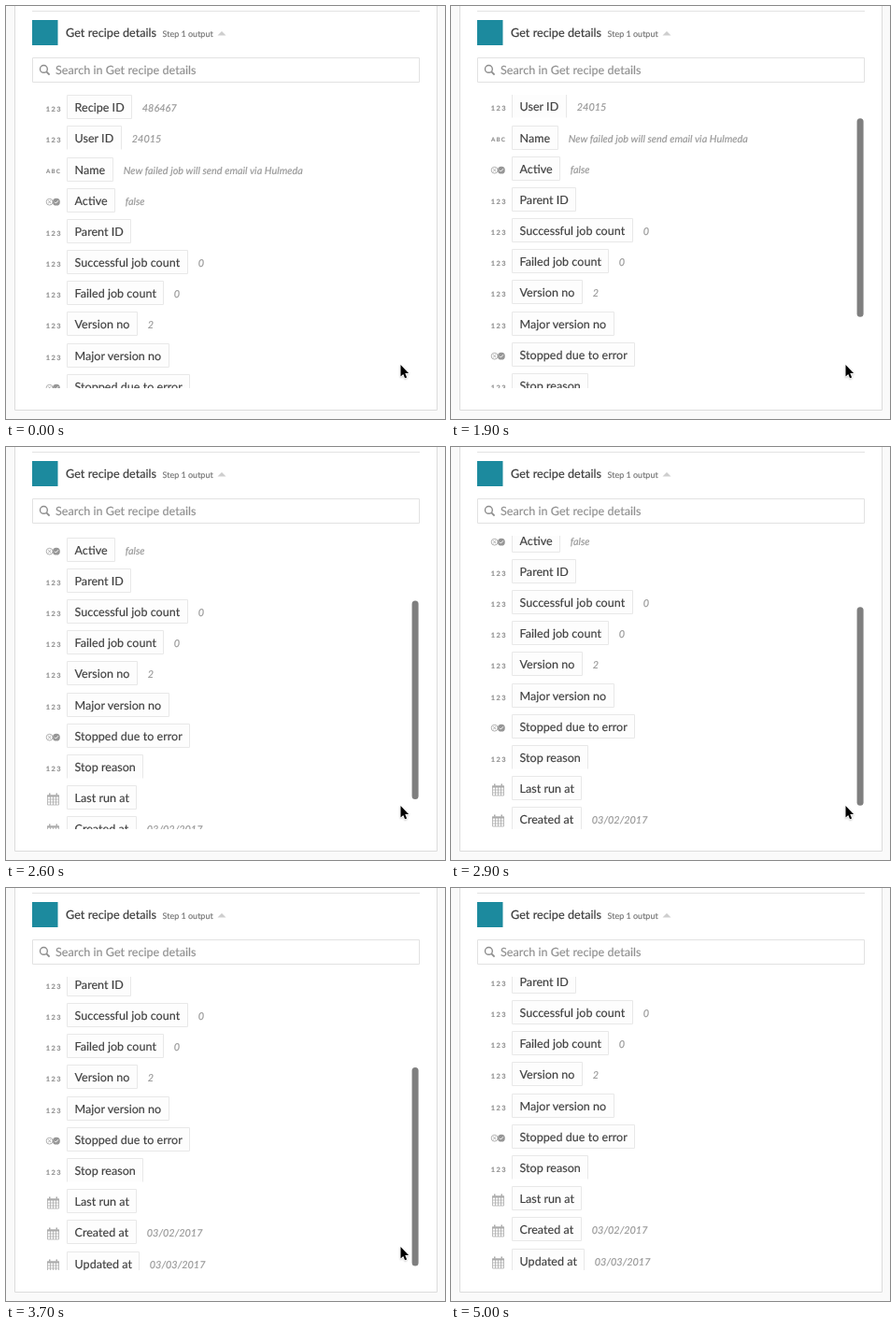
An HTML page with a canvas that plays this animation: 470x442 px, repeating every 5.4 s.

```html
<!DOCTYPE html>
<html lang="en">
<head>
<meta charset="utf-8">
<title>Recipe details</title>
<style>
  html, body { margin: 0; width: 470px; height: 442px; overflow: hidden; background: #fafafa; }
  canvas { display: block; }
</style>
</head>
<body>
<canvas id="stage" width="470" height="442"></canvas>
<script>
const ctx = document.getElementById('stage').getContext('2d');
const LOOP = 5400, STEP = 100;
const VIEW = { top: 95, bottom: 409 };
const FAMILY = 'Lato, "Open Sans", sans-serif';
const ZOOM = 10; // text is laid out large and drawn small, so advances are not rounded
const LABEL = 12.6;

// type, label, value, open bottom edge
const ROWS = [
  ['num', 'Recipe ID', '486467'],
  ['num', 'User ID', '24015', true],
  ['abc', 'Name', 'New failed job will send email via Hulmeda'],
  ['bool', 'Active', 'false'],
  ['num', 'Parent ID'],
  ['num', 'Successful job count', '0'],
  ['num', 'Failed job count', '0'],
  ['num', 'Version no', '2'],
  ['num', 'Major version no'],
  ['bool', 'Stopped due to error'],
  ['num', 'Stop reason', '', true],
  ['date', 'Last run at'],
  ['date', 'Created at', '03/02/2017'],
  ['date', 'Updated at', '03/03/2017']
];

// time, scroll offset
const KEYS = [[1600, 5], [2200, 63], [2600, 98], [3300, 120], [3700, 138], [3800, 141]];

function slope(i) {
  const rate = k => (KEYS[k + 1][1] - KEYS[k][1]) / (KEYS[k + 1][0] - KEYS[k][0]);
  if (i === 0) return rate(0);
  if (i === KEYS.length - 1) return rate(i - 1);
  const a = rate(i - 1), b = rate(i);
  return 2 * a * b / (a + b);
}

function scrollAt(t) {
  if (t < KEYS[0][0]) return 0;
  const last = KEYS.length - 1;
  if (t >= KEYS[last][0]) return KEYS[last][1];
  const i = KEYS.findIndex((k, n) => t < KEYS[n + 1][0]);
  const [t0, y0] = KEYS[i], [t1, y1] = KEYS[i + 1];
  const h = t1 - t0, u = (t - t0) / h, v = 1 - u;
  const y = v * v * (1 + 2 * u) * y0 + u * u * (3 - 2 * u) * y1
          + h * u * v * (v * slope(i) - u * slope(i + 1));
  return Math.round(y);
}

function setFont(size, style = '', spacing = 0) {
  ctx.font = `${style} ${size * ZOOM}px ${FAMILY}`;
  ctx.letterSpacing = spacing * ZOOM + 'px';
  ctx.textRendering = 'geometricPrecision';
}

function textWidth(str, size) {
  setFont(size);
  return ctx.measureText(str).width / ZOOM;
}

function text(str, x, y, size, color, style, spacing) {
  ctx.save();
  ctx.translate(x, y);
  ctx.scale(1 / ZOOM, 1 / ZOOM);
  setFont(size, style, spacing);
  ctx.fillStyle = ctx.strokeStyle = color;
  ctx.lineWidth = 0.18 * ZOOM;
  ctx.lineJoin = 'round';
  ctx.fillText(str, 0, 0);
  ctx.strokeText(str, 0, 0);
  ctx.restore();
}

function path(points, closed) {
  ctx.beginPath();
  points.forEach(([x, y]) => ctx.lineTo(x, y));
  if (closed) ctx.closePath();
}

function stroke(color, width = 1) {
  ctx.strokeStyle = color;
  ctx.lineWidth = width;
  ctx.stroke();
}

function line(color, width, ...points) {
  path(points);
  stroke(color, width);
}

function circle(x, y, r) {
  ctx.beginPath();
  ctx.arc(x, y, r, 0, Math.PI * 2);
}

const icons = {
  num: y => text('123', 42.8, y + 5, 7.4, '#929292', 'bold', 1.4),
  abc: y => text('ABC', 43, y + 4, 6.2, '#929292', 'bold', 1.2),
  bool(y) {
    const c = y + 1.7;
    circle(46.6, c, 3.4);
    stroke('#a6a6a6', 0.9);
    line('#a6a6a6', 0.9, [45.2, c - 1.4], [48, c + 1.4]);
    line('#a6a6a6', 0.9, [48, c - 1.4], [45.2, c + 1.4]);
    circle(53.9, c, 3.9);
    ctx.fillStyle = '#969696';
    ctx.fill();
    line('#fff', 1, [52, c], [53.4, c + 1.4], [55.9, c - 1.4]);
  },
  date(y) {
    const top = y - 2;
    ctx.fillStyle = '#a8a8a8';
    ctx.fillRect(44, top - 0.5, 13, 2);
    ctx.fillRect(46, top - 2.5, 1.5, 2);
    ctx.fillRect(53.5, top - 2.5, 1.5, 2);
    ctx.beginPath();
    ctx.rect(44.5, top, 12, 10);
    for (let i = 1; i < 4; i++) {
      ctx.moveTo(44.5 + i * 3, top);
      ctx.lineTo(44.5 + i * 3, top + 10);
    }
    for (let i = 1; i < 3; i++) {
      ctx.moveTo(44.5, top + 1 + i * 3);
      ctx.lineTo(56.5, top + 1 + i * 3);
    }
    stroke('#adadad', 0.8);
  }
};

function drawRow([type, label, value, open], y) {
  if (y < VIEW.top - 20 || y > VIEW.bottom + 20) return;
  icons[type](y);
  const left = 65.5, right = Math.round(81 + textWidth(label, LABEL)) + 0.5;
  const top = y - 12.5, bottom = y + 12.5;
  path([[left, bottom], [left, top], [right, top], [right, bottom]], !open);
  ctx.fillStyle = '#fdfdfd';
  ctx.fill();
  stroke('#e8e8e8');
  text(label, 73.5, y + 4.5, LABEL, '#404040');
  if (value) text(value, right + 11.2, y + 4.5, 10.93, '#989898', 'italic');
}

function drawFrame() {
  ctx.fillStyle = '#fafafa';
  ctx.fillRect(0, 0, 470, 442);
  ctx.beginPath();
  ctx.rect(9.5, -5, 452, 437.5);
  ctx.fillStyle = '#fff';
  ctx.fill();
  stroke('#dcdcdc');
  line('#e2e2e2', 1, [28, 5.5], [443, 5.5]);

  ctx.fillStyle = '#1c8a9e';
  ctx.fillRect(28, 15, 27.5, 27);
  text('Get recipe details', 64, 32.7, 12.7, '#3a3a3a');
  text('Step 1 output', 167.5, 32.7, 9, '#747474');
  path([[226.5, 31.5], [231, 27], [235.5, 31.5]], true);
  ctx.fillStyle = '#cecece';
  ctx.fill();

  ctx.beginPath();
  ctx.rect(28.5, 55.5, 414, 26);
  stroke('#e2e2e2');
  circle(40.4, 67.4, 3.9);
  stroke('#8c8c8c', 1.4);
  line('#8c8c8c', 1.8, [43.3, 70.3], [46.6, 73.6]);
  text('Search in Get recipe details', 53, 73, 12.65, '#909090');
}

function drawBar(scroll, alpha) {
  ctx.globalAlpha = alpha;
  ctx.beginPath();
  ctx.roundRect(434.6, 96.8 + 0.69 * scroll, 7, 212.5, 3.5);
  ctx.fillStyle = '#7f7f7f';
  ctx.fill();
  ctx.globalAlpha = 1;
}

function drawCursor(x, y) {
  ctx.save();
  ctx.translate(x, y);
  ctx.scale(0.92, 0.95);
  path([[0, 0], [0, 13.2], [3, 10.4], [5, 15], [7.2, 14.1], [5.2, 9.5], [9.3, 9.5]], true);
  ctx.lineJoin = 'round';
  ctx.shadowColor = 'rgba(0,0,0,.2)';
  ctx.shadowBlur = 2;
  ctx.shadowOffsetY = 1;
  stroke('#fff', 1.6);
  ctx.shadowColor = 'transparent';
  ctx.fillStyle = '#000';
  ctx.fill();
  ctx.restore();
}

function draw(t) {
  const scroll = scrollAt(t);
  drawFrame();

  ctx.save();
  ctx.beginPath();
  ctx.rect(28, VIEW.top, 415, VIEW.bottom - VIEW.top);
  ctx.clip();
  ROWS.forEach((row, i) => drawRow(row, Math.floor(108.65 + 33.183 * i) - scroll));
  if (t >= 1600 && t < 4700) drawBar(scroll, Math.min(1, (4700 - t) / 400));
  ctx.restore();

  const leave = Math.max(0, (t - 4300) / 300);
  if (t < 4700) drawCursor(422.5 - 51 * leave ** 1.3, 384 + 46 * leave ** 1.3);
}

const start = performance.now();
function tick() {
  const t = (performance.now() - start) % LOOP;
  draw(Math.floor(t / STEP) * STEP);
  requestAnimationFrame(tick);
}
tick();
</script>
</body>
</html>
```
